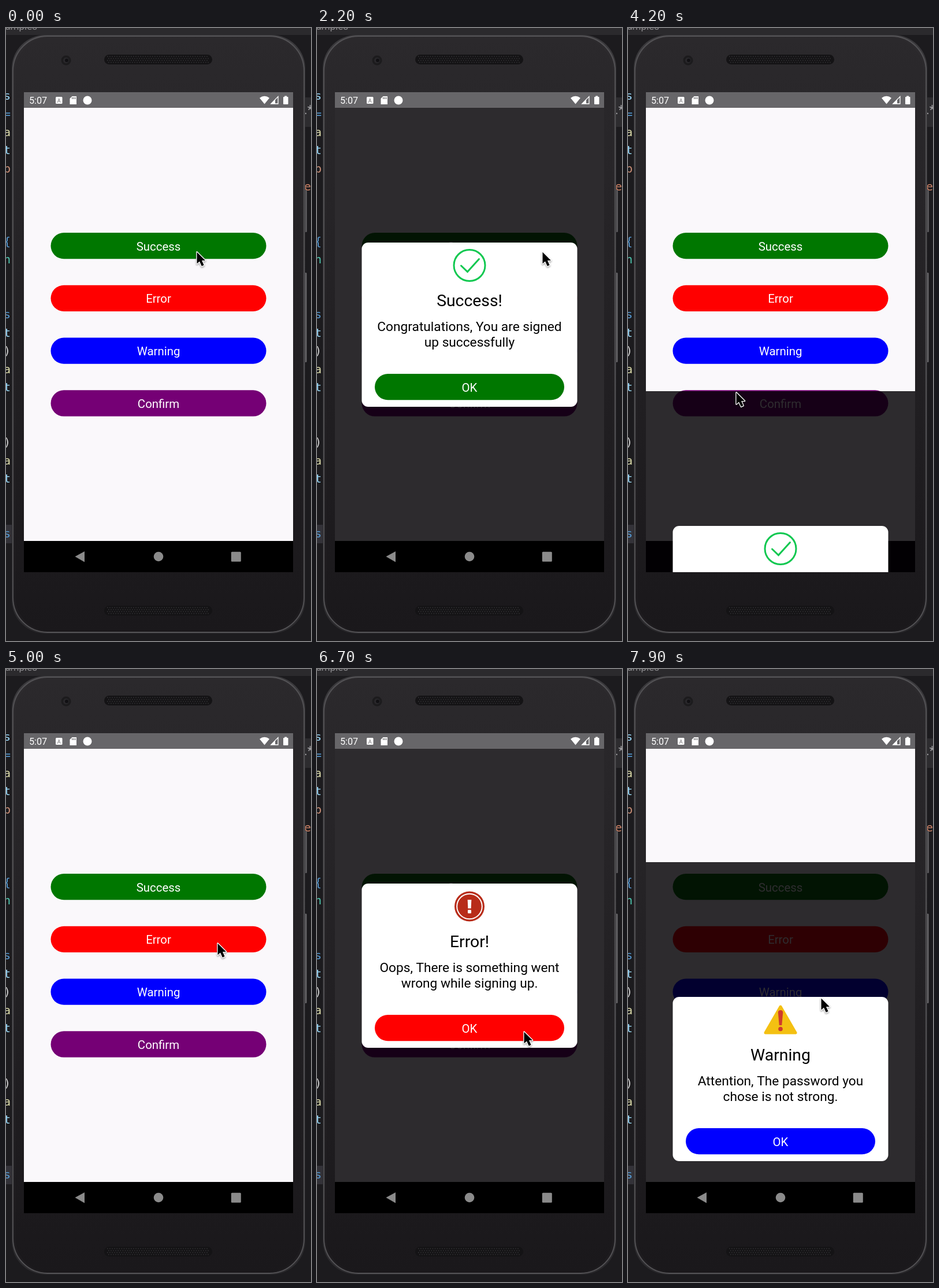
An HTML page with a canvas for the animation above (8000 ms loop, 528 by 1060 pixels).

```html
<!DOCTYPE html>
<html lang="en">
<head>
<meta charset="utf-8">
<title>Alert modals</title>
<style>
html, body { margin: 0; width: 100%; height: 100%; overflow: hidden; background: #1c1b1e; }
canvas { display: block; width: 528px; height: 1060px; }
</style>
</head>
<body>
<canvas id="stage" width="528" height="1060"></canvas>
<script>
const ctx = document.getElementById('stage').getContext('2d');
const LOOP = 8000, STEP = 100, SLIDE = 200, MODAL_H = 749;
const SANS = 'Roboto, sans-serif', MONO = '"DejaVu Sans Mono", monospace';
const GREEN = '#007700', RED = '#ff0000', BLUE = '#0000ff', PURPLE = '#750075';

const buttons = [
  ['Success', 354, GREEN], ['Error', 444.7, RED],
  ['Warning', 535.5, BLUE], ['Confirm', 626.3, PURPLE]
];

const modals = [
  { open: 1569, close: 4080, title: 'Success!', color: GREEN, icon: checkIcon,
    lines: ['Congratulations, You are signed', 'up successfully'] },
  { open: 5320, close: 6880, title: 'Error!', color: RED, icon: errorIcon,
    lines: ['Oops, There is something went', 'wrong while signing up.'] },
  { open: 7768.5, close: 9999, title: 'Warning', color: BLUE, icon: warningIcon,
    lines: ['Attention, The password you', 'chose is not strong.'] }
];

// time, x, y of the pointer tip
const path = [
  [0, 330, 387], [200, 330, 387], [900, 390, 387], [2500, 390, 387],
  [3500, 187, 630], [4200, 187, 630], [4900, 366, 474], [5400, 366, 474],
  [5700, 362, 575], [6200, 358, 627], [7000, 358, 627], [7500, 334, 569], [8000, 334, 569]
];

const clamp = v => Math.max(0, Math.min(1, v));
const ease = v => 0.5 - 0.5 * Math.cos(Math.PI * clamp(v));

function box(x, y, w, h, r, fill) {
  ctx.beginPath();
  ctx.roundRect(x, y, w, h, r);
  ctx.fillStyle = fill;
  ctx.fill();
}

function disc(x, y, r, fill) {
  ctx.beginPath();
  ctx.arc(x, y, r, 0, Math.PI * 2);
  ctx.fillStyle = fill;
  ctx.fill();
}

function trace(points, closed) {
  ctx.beginPath();
  points.forEach(([x, y]) => ctx.lineTo(x, y));
  if (closed) ctx.closePath();
}

function poly(points, fill) {
  trace(points, true);
  ctx.fillStyle = fill;
  ctx.fill();
}

function stroke(color, width) {
  ctx.strokeStyle = color;
  ctx.lineWidth = width;
  ctx.stroke();
}

function label(str, x, y, size, fill, align = 'center', family = SANS) {
  ctx.font = `${size}px ${family}`;
  ctx.textAlign = align;
  ctx.fillStyle = fill;
  ctx.fillText(str, x, y);
}

function fade(y0, y1, from, to) {
  const g = ctx.createLinearGradient(0, y0, 0, y1);
  g.addColorStop(0, from);
  g.addColorStop(1, to);
  return g;
}

function editor() {
  box(0, 0, 528, 1060, 0, '#1c1b1e');
  box(0, 0, 528, 12, 0, '#2b2a2d');
  label('amples', 54, 3, 17, '#8c8b8e', 'right');
  box(0, 859, 12, 32, 0, '#333238');
  box(514, 120, 14, 51, 0, '#2d2c2f');
  const blue = '#569cd6', cyan = '#9cdcfe', yellow = '#dcdcaa', plain = '#d4d4d4';
  const rows = [
    ['s', 0, cyan], ['=', 1, blue], ['a', 2, yellow], ['t', 3, cyan], ['p', 4, '#ce9178'],
    ['{', 8, blue], ['n', 9, '#4ec9b0'], ['s', 12, blue], ['t', 13, cyan], [')', 14, plain],
    ['a', 15, yellow], ['t', 16, cyan], [')', 19, plain], ['a', 20, yellow],
    ['t', 21, cyan], ['s', 24, blue]
  ];
  rows.forEach(([s, row, c]) => label(s, 8, 123.5 + row * 31.55, 20, c, 'right', MONO));
  label('.*', 516, 149, 22, '#a5a4a7', 'left');
  label('e', 516, 281, 20, '#ce8468', 'left', MONO);
}

function speaker(y) {
  box(170, y, 187, 17, 8.5, '#141315');
  ctx.fillStyle = '#333235';
  for (let row = 0; row < 4; row++) {
    for (let i = 0; i < 43; i++) {
      ctx.fillRect(175 + i * 4.1 + (row % 2) * 2, y + 2.5 + row * 3.4, 1.6, 1.6);
    }
  }
}

function phone() {
  box(517, 280, 4, 73, 1.5, '#58575a');
  box(517, 423, 3.5, 155, 1.5, '#69686b');
  box(10, 12, 508, 1035, 58, fade(12, 1047, '#3a393c', '#2b2a2d'));
  box(13, 14.5, 502, 1030, 60, fade(12, 1047, '#2d2b2e', '#1d1b1e'));
  box(16, 16, 496, 1027, 60, fade(16, 1043, '#2b292c', '#1a181b'));
  ctx.beginPath();
  ctx.roundRect(12, 14, 504, 1031, 60);
  stroke('#545356', 1.8);
  speaker(46);
  speaker(999);
  disc(104, 56, 8.5, '#1c1b1d');
  disc(104, 56, 5, '#29282b');
  disc(105, 56, 3, '#111013');
}

function statusBar() {
  const bar = '#676669';
  box(31, 111, 466, 27.5, 0, bar);
  label('5:07', 40, 131.3, 16.2, '#fff', 'left');
  box(86, 119, 11.5, 12, 1.5, '#fff');
  label('A', 91.8, 128.5, 9, bar);
  poly([[114.5, 118], [122, 118], [122, 132], [110.5, 132], [110.5, 122]], '#fff');
  [114, 116.6, 119.2].forEach(x => box(x, 119.7, 1.3, 3, 0, bar));
  disc(141, 125, 7.5, '#fff');
  ctx.beginPath();
  ctx.moveTo(447.5, 131.5);
  ctx.lineTo(439, 121);
  ctx.quadraticCurveTo(447.5, 114.5, 456, 121);
  ctx.closePath();
  ctx.fillStyle = '#fff';
  ctx.fill();
  trace([[471, 118.5], [471, 131], [458.8, 131]], true);
  stroke('#fff', 1.3);
  poly([[466, 123.5], [466, 131], [458.8, 131]], '#fff');
  box(480, 119, 8.5, 13, 1, '#fff');
  box(482.2, 117.5, 4, 2.5, 0, '#fff');
}

function app() {
  box(31, 138, 466, 749, 0, '#faf8fb');
  buttons.forEach(([name, y, color]) => {
    box(77.5, y, 373, 45.3, 22.65, color);
    label(name, 264, y + 30.6, 20.4, '#fff');
  });
}

function navBar() {
  box(31, 887, 466, 54, 0, '#000');
  poly([[119.5, 914], [136, 905], [136, 923.5]], '#8b8b8b');
  disc(264, 914, 8.3, '#8b8b8b');
  box(389.8, 905.8, 17, 17, 1.5, '#8b8b8b');
}

function checkIcon() {
  ctx.beginPath();
  ctx.arc(264, 410.5, 27, 0, Math.PI * 2);
  stroke('#10c850', 3);
  ctx.lineCap = 'round';
  trace([[249.5, 411], [260.5, 421.5], [280.5, 399.5]]);
  stroke('#10c850', 3);
  ctx.lineCap = 'butt';
}

function errorIcon() {
  disc(264, 410.5, 26, '#b82c19');
  ctx.beginPath();
  ctx.arc(264, 410.5, 21.8, 0, Math.PI * 2);
  stroke('#fff', 2);
  poly([[260.7, 399], [267.3, 399], [266.6, 414], [261.4, 414]], '#fff');
  box(261, 416.5, 6, 6, 1, '#fff');
}

function warningIcon() {
  const yellow = '#f4c012', red = '#cf3b2c';
  const tri = [[264, 388], [290, 433], [238, 433]];
  ctx.lineJoin = 'round';
  poly(tri, yellow);
  trace(tri, true);
  stroke(yellow, 5);
  ctx.lineJoin = 'miter';
  box(259.8, 394, 8.4, 8, 4, red);
  poly([[259.8, 398], [268.2, 398], [266.3, 420], [261.7, 420]], red);
  disc(264, 426.5, 3.8, red);
}

function drawModal(m, offset) {
  ctx.save();
  ctx.beginPath();
  // A low sheet also covers the navigation bar.
  ctx.rect(31, 138, 466, (offset > 200 ? 941 : 887) - 138);
  ctx.clip();
  ctx.translate(0, offset);
  box(31, 138, 466, MODAL_H, 0, 'rgba(3,0,4,.826)');
  box(77.5, 371, 373, 284, 11, '#fff');
  m.icon();
  label(m.title, 264, 480.6, 28.35, '#000');
  m.lines.forEach((s, i) => label(s, 264, 524 + i * 26.8, 22.7, '#000'));
  box(100, 598, 328, 45.3, 22.65, m.color);
  label('OK', 264, 628.6, 20.4, '#fff');
  ctx.restore();
}

function pointer(t) {
  const i = path.findIndex((p, k) => k > 0 && t <= p[0]);
  const [t0, x0, y0] = path[i - 1], [t1, x1, y1] = path[i];
  const k = ease((t - t0) / (t1 - t0));
  ctx.save();
  ctx.translate(x0 + (x1 - x0) * k, y0 + (y1 - y0) * k);
  ctx.lineJoin = 'round';
  trace([[0.5, 0.5], [0.5, 20.5], [5, 16.5], [8.8, 24.8], [12.6, 23], [9, 15], [15, 15]], true);
  ctx.shadowColor = 'rgba(0,0,0,.4)';
  ctx.shadowBlur = 3;
  ctx.shadowOffsetY = 1.5;
  stroke('#fff', 2.6);
  ctx.shadowColor = 'transparent';
  ctx.fillStyle = '#000';
  ctx.fill();
  ctx.restore();
}

function render(t) {
  editor();
  phone();
  statusBar();
  app();
  navBar();
  const m = modals.find(d => t > d.open && t < d.close + SLIDE);
  if (m) {
    const shown = t < m.close ? ease((t - m.open) / SLIDE) : 1 - ease((t - m.close) / SLIDE);
    drawModal(m, Math.floor(MODAL_H * (1 - shown)));
  }
  pointer(t);
}

const start = performance.now();
function tick() {
  const t = (performance.now() - start) % LOOP;
  render(Math.floor(t / STEP) * STEP);
  requestAnimationFrame(tick);
}
tick();
</script>
</body>
</html>
```
